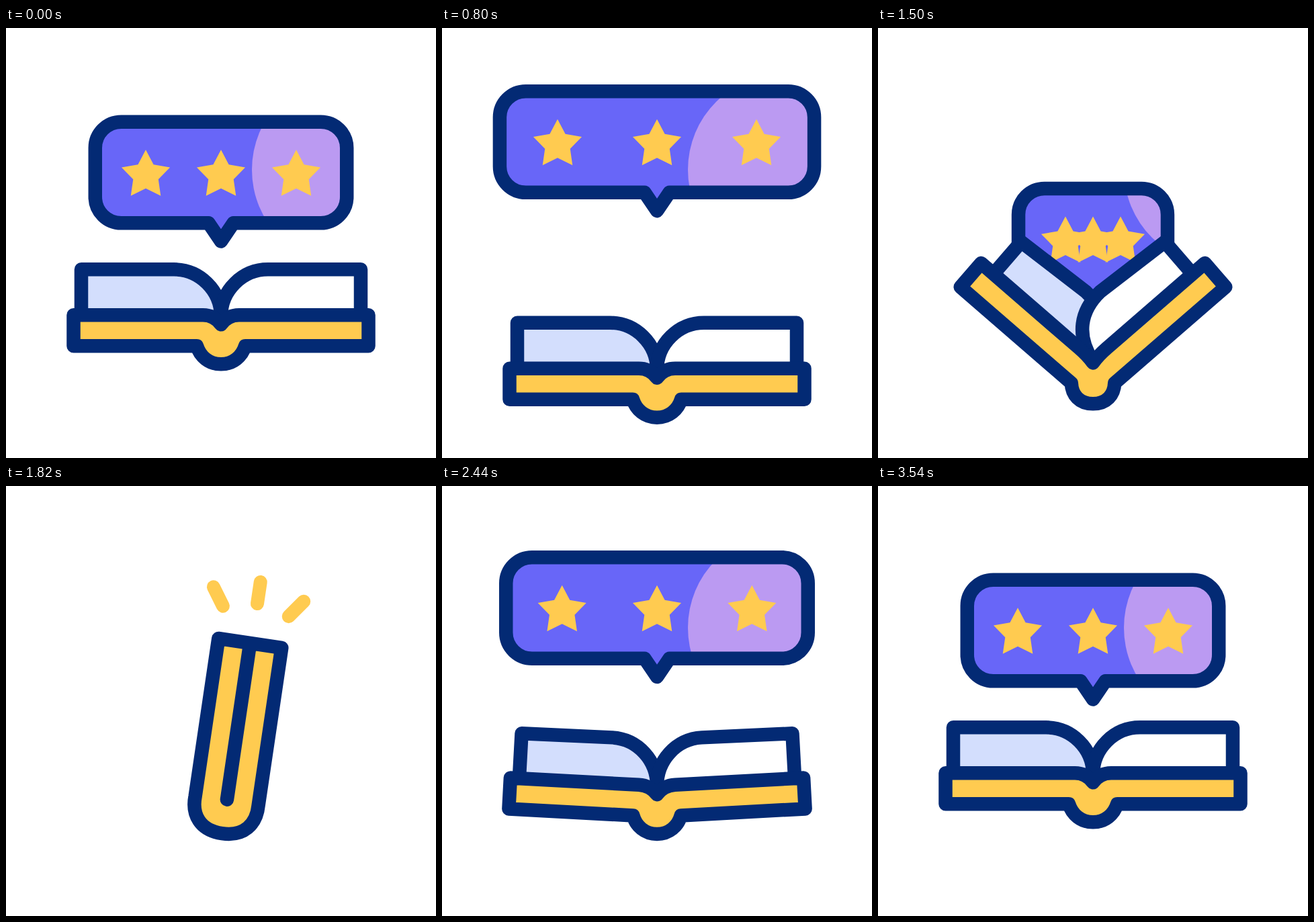
Write an HTML page that moves like this. It is 640x640 px and loops after 3.6 s.

```html
<!DOCTYPE html>
<html lang="en">
<head>
<meta charset="utf-8">
<title>Book review</title>
<style>
  html, body { margin: 0; width: 100%; height: 100%; overflow: hidden; background: #fff; }
  svg { display: block; width: 100vw; height: 100vh; }
  .line { stroke: #032a74; stroke-width: 20.5; stroke-linejoin: round; stroke-linecap: round; }
  .star, .cover { fill: #ffcb50; }
  .spark { stroke: #ffcb50; stroke-width: 20; stroke-linecap: round; }
</style>
</head>
<body>
<svg viewBox="0 0 640 640">
  <defs>
    <clipPath id="above"><path id="abovePath"/></clipPath>
    <clipPath id="inside"><path id="insidePath"/></clipPath>
  </defs>
  <g id="bubble" clip-path="url(#above)">
    <path id="bubbleFill" fill="#6866f8"/>
    <circle cx="509" cy="211" r="143" fill="#bb9af2" clip-path="url(#inside)"/>
    <path class="star"/><path class="star"/><path class="star"/>
    <path id="bubbleLine" class="line" fill="none"/>
  </g>
  <g id="book">
    <path id="pageL" class="line" fill="#d3defd"/>
    <path id="pageR" class="line" fill="#fff"/>
    <path id="cover" class="line cover"/>
    <line class="spark"/><line class="spark"/><line class="spark"/>
  </g>
</svg>
<script>
const LOOP = 3600, MID = 320;
const $ = id => document.getElementById(id);
const stars = [...document.querySelectorAll('.star')];
const sparks = [...document.querySelectorAll('.spark')];

const clamp = x => Math.max(0, Math.min(1, x));
const smooth = x => x * x * (3 - 2 * x);
const quadIn = x => x * x;
const quadOut = x => 1 - (1 - x) * (1 - x);

// Cubic bezier timing with flat ends: handles (a, 0) and (b, 1).
const bezier = (a, b) => x => {
  let lo = 0, hi = 1;
  for (let i = 0; i < 24; i++) {
    const p = (lo + hi) / 2, q = 1 - p;
    if (3 * a * p * q * q + 3 * b * p * p * q + p * p * p < x) lo = p; else hi = p;
  }
  return smooth(lo);
};

// Keys are [time, value, easing into this key].
function track(t, keys) {
  if (t <= keys[0][0]) return keys[0][1];
  for (let i = 1; i < keys.length; i++) {
    const [t1, v1, ease = smooth] = keys[i], [t0, v0] = keys[i - 1];
    if (t < t1) return v0 + (v1 - v0) * ease((t - t0) / (t1 - t0));
  }
  return keys[keys.length - 1][1];
}

const REST = 129.3, PEAK = 78.3, FLAT = 427.3;
const topKeys = [[260, REST], [940, PEAK], [1160, PEAK], [1760, 328], [1980, 328],
  [2530, PEAK], [2760, PEAK], [3150, 155], [3510, REST]];
const hingeKeys = [[260, FLAT], [820, 507], [1160, 519], [1320, 519], [1760, 452],
  [1900, 452], [2120, 502.3], [2840, FLAT, bezier(.25, .2)]];
const bendKeys = [[1089, 0], [1700, 90, quadIn], [1920, 90], [2560, 0, quadOut]];
const tiltKeys = [[1640, 0], [1820, 8.4], [1840, 8.4], [2260, 0]];
const sparkHead = [[1690, 0], [1820, 1]];
const sparkTail = [[1830, 0], [1960, 1]];
const sparkLines = [[-48, 182, -66, 156], [2, 171, 2, 138.5], [51, 183, 70, 157.5]];

function bubbleHalf(t) {
  const slope = t > 1000 && t < 2700 ? .857 : 1.03;
  return Math.max(52, 250 - slope * (track(t, topKeys) - PEAK));
}

function starPath(cx, cy) {
  let d = '';
  for (let i = 0; i < 10; i++) {
    const r = i % 2 ? 19.7 : 37.9, a = i * Math.PI / 5;
    d += `${i ? 'L' : 'M'}${cx + r * Math.sin(a)} ${cy - r * Math.cos(a)}`;
  }
  return d + 'Z';
}

function bubblePath(top, half) {
  const r = 38.75, y0 = top + 10.4, y1 = top + 161;
  const l = MID - half + 10.25, e = MID + half - 10.25;
  const arc = (x, y) => `A${r} ${r} 0 0 1 ${x} ${y}`;
  return `M${l + r} ${y0}H${e - r}${arc(e, y0 + r)}V${y1 - r}${arc(e - r, y1)}` +
    `H338.5L${MID} ${top + 188.3}L301.5 ${y1}H${l + r}${arc(l, y1 - r)}V${y0 + r}${arc(l + r, y0)}Z`;
}

// Maps wing coordinates (out from the hinge, down) to the stage.
function wing(side, bend, hinge) {
  const c = Math.cos(bend), s = Math.sin(bend);
  return (out, down) => [MID + side * (out * c + down * s), hinge - out * s + down * c];
}

function pagePath(at, bend, hinge) {
  const k = 1 - smooth(clamp((bend - .78) / .7));
  const p = (out, up) => at(out, -up * k).join(' ');
  const early = Math.min(1, bend / .25), u = Math.min(1, bend / .6);
  const edge = 208 - 12 * early;
  return `M${p(edge, 0)}L${p(edge, 68 - 5 * early)}L${p(70 + 5 * u, 68 + 2 * u)}` +
    `C${p(32 + 2 * u, 68)} ${p(5 * early, 37 + 8 * u)} ${MID} ${hinge + 2}`;
}

function coverPath(left, right, bend, hinge) {
  const s = Math.sin(bend), c = Math.cos(bend);
  const len = 219.5 - 3 * Math.min(1, bend / .15) * Math.cos(2.6 * bend);
  const thick = 46 + 1.5 * s;
  const notch = `${MID} ${hinge + 14 - 10 * Math.sin(2 * bend)}`;
  const low = hinge + 73 - 8 * Math.min(1, bend / .35);
  const [lx, ly] = left(36 - 52 * s, thick), [rx, ry] = right(36 - 52 * s, thick);
  const drop = .57 * (low - ly), inset = 4.7 - 6 * s, flat = (rx - lx) * (.25 + .1 * s);
  const p = (at, out, down) => at(out, down).join(' ');
  return `M${p(left, len, 0)}L${p(left, 27, 0)}Q${p(left, 10, 0)} ${notch}` +
    `Q${p(right, 10, 0)} ${p(right, 27, 0)}L${p(right, len, 0)}L${p(right, len, thick)}L${rx} ${ry}` +
    `C${rx - inset} ${ry + drop} ${MID + flat} ${low} ${MID} ${low}` +
    `C${MID - flat} ${low} ${lx + inset} ${ly + drop} ${lx} ${ly}L${p(left, len, thick)}Z`;
}

function drawBubble(t, bend, hinge, left, right) {
  const top = track(t, topKeys), d = bubblePath(top, bubbleHalf(t));
  for (const id of ['bubbleFill', 'insidePath', 'bubbleLine']) $(id).setAttribute('d', d);
  // The stars run slightly ahead of the bubble on its way down.
  const gap = 250 - bubbleHalf(t > 2700 ? t + 20 : t);
  const spread = Math.max(0, 152 - .693 * gap - .00131 * gap * gap);
  stars.forEach((star, i) => star.setAttribute('d', starPath(MID + (i - 1) * spread, top + 89.8)));
  $('abovePath').setAttribute('d',
    `M${MID} ${hinge}L${left(219, 0).join(' ')}L0 0H640L${right(219, 0).join(' ')}Z`);
  $('bubble').style.display = bend > 1.4 ? 'none' : '';
}

function drawSparks(t) {
  const head = track(t, sparkHead), tail = track(t, sparkTail);
  sparks.forEach((line, i) => {
    const [x0, y0, x1, y1] = sparkLines[i];
    const put = (n, k) => {
      line.setAttribute('x' + n, MID + x0 + (x1 - x0) * k);
      line.setAttribute('y' + n, y0 + (y1 - y0) * k);
    };
    put(1, tail);
    put(2, head);
    line.style.display = head > 0 && tail < 1 ? '' : 'none';
  });
}

function draw(t) {
  const bend = track(t, bendKeys) * Math.PI / 180, hinge = track(t, hingeKeys);
  const left = wing(-1, bend, hinge), right = wing(1, bend, hinge);
  drawBubble(t, bend, hinge, left, right);
  $('pageL').setAttribute('d', pagePath(left, bend, hinge));
  $('pageR').setAttribute('d', pagePath(right, bend, hinge));
  $('cover').setAttribute('d', coverPath(left, right, bend, hinge));
  $('book').setAttribute('transform', `rotate(${track(t, tiltKeys)} ${MID} ${hinge + 75})`);
  drawSparks(t);
}

const start = performance.now();
function frame() {
  draw((performance.now() - start) % LOOP);
  requestAnimationFrame(frame);
}
frame();
</script>
</body>
</html>
```
